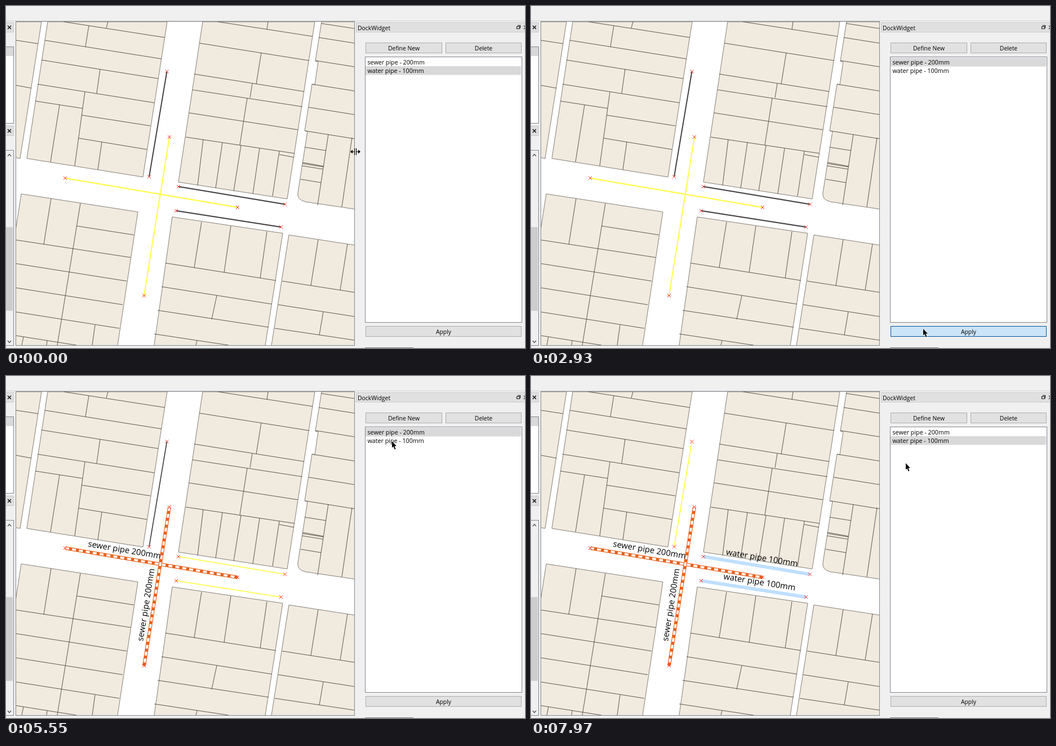
Write an HTML page with a canvas that moves like this. It is 921 px wide and 608 px high and loops after 8 s.

```html
<!DOCTYPE html>
<html lang="en">
<head>
<meta charset="utf-8">
<title>Pipe styles</title>
<style>
html, body { margin: 0; width: 100%; height: 100%; overflow: hidden; background: #f0f0f0; }
canvas { display: block; }
</style>
</head>
<body>
<canvas id="stage" width="921" height="608"></canvas>
<script>
const ctx = document.getElementById('stage').getContext('2d', { alpha: false });
const LOOP = 8000;
const FONT = '"Open Sans", "Noto Sans", sans-serif';
const YELLOW = '#ffff38', DARK = '#403d40', ORANGE = '#e9601a', BLUE = '#bfdfff';
const TITLE_BAR = '#e0e0e0';

// City blocks: outline and the parcel boundaries inside it.
const blocks = [
  ['M10 28H63L25 271L10 268Z',
   'M18 61L57 67M18 141L45 146'],
  ['M74 28H286L243 304L37 271Z',
   'M102 28L282 56M181 28L178 39M147 35L141 72M69 61L276 94M63 96L270 129M167 112L161 155' +
   'M56 139L263 172M140 153L122 284M134 194L256 213M129 235L250 255M170 242L163 291' +
   'M52 169L136 182M95 176L79 277'],
  ['M349 28H548L499 343L306 313Z',
   'M376 28L544 54M465 28L463 42M343 66L538 97M453 83L444 139M334 121L529 152M437 138L433 163' +
   'M331 149L526 179M428 164L415 247M325 190L518 220M319 233L512 262M350 237L340 319' +
   'M384 243L372 324M417 248L404 329M450 253L438 334M485 258L473 338M485 264L511 269'],
  ['M560 28H625V362L531 348Q516 344 518 332L535 223L530 222L543 139L548 140L554 99L549 98Z',
   'M559 31L618 40M555 56L618 66M549 97L618 108M543 139L618 151M537 180L618 193M531 222L618 236' +
   'M572 228L553 354M614 234L596 357M530 251L568 257M526 278L564 285M526 280L563 286' +
   'M525 284L562 290M523 308L559 314'],
  ['M10 445L27 334L234 366L197 610H10Z',
   'M80 342L67 424M132 351L91 603M125 391L227 407M18 416L221 447M18 458L214 489M18 501L207 531' +
   'M18 544L201 573M18 586L125 603M31 588L28 603M73 595L72 603M158 567L153 603'],
  ['M295 375L491 404L459 610H262Z',
   'M347 384L334 465M399 391L387 474M463 401L451 484M283 457L479 488M276 499L472 530' +
   'M374 515L365 557M269 541L466 571M263 583L395 603M339 595L337 603'],
  ['M502 407L618 425L625 426V610H470Z',
   'M554 415L541 497M606 423L593 505M490 489L618 509M483 531L618 552M477 573L618 594M563 544L556 585']
].map(pair => pair.map(d => new Path2D(d)));

const sewerLines = [[105, 306, 411, 358], [290, 233, 245, 515]];
const waterLines = [[306, 321, 495, 352.5], [302, 364, 488, 393]];
const spareLine = [254, 303.5, 285.5, 116.5];

const sewerLabels = [[145, 303, 9.67], [243, 472, -80.9]];
const waterLabels = [[345.5, 317.5, 9.5], [341, 361, 9.1]];

// Pointer stops: time, x, y
const stops = [
  [0, 620, 259], [830, 620, 259], [1580, 701, 99], [2009, 701, 99], [2010, 700, 195],
  [2590, 696, 574], [3409, 696, 574], [3410, 695, 560], [4180, 460, 316], [4310, 460, 316],
  [4720, 463, 416], [4940, 463, 416], [5550, 685, 116], [5700, 686, 105], [5809, 686, 105],
  [5810, 687, 104], [5950, 687, 104], [6310, 730, 570], [6350, 731, 571], [6930, 731, 571],
  [7380, 300, 178], [7440, 300, 178], [7710, 262, 226], [7740, 262, 226], [7970, 665, 155], [8000, 665, 155]
];

function pointerAt(t) {
  const i = Math.max(1, stops.findIndex(s => s[0] > t));
  const [t0, x0, y0] = stops[i - 1], [t1, x1, y1] = stops[i];
  const u = (t - t0) / (t1 - t0), k = u * u * (3 - 2 * u);
  return [x0 + (x1 - x0) * k, y0 + (y1 - y0) * k].map(Math.round);
}

function box(x, y, w, h, fill, stroke) {
  ctx.fillStyle = fill;
  ctx.fillRect(x, y, w, h);
  if (!stroke) return;
  ctx.strokeStyle = stroke;
  ctx.lineWidth = 1;
  ctx.strokeRect(x + 0.5, y + 0.5, w - 1, h - 1);
}

function path(d, color, width = 1) {
  ctx.strokeStyle = color;
  ctx.lineWidth = width;
  ctx.stroke(new Path2D(d));
}

function text(str, x, y, size = 10.4, align = 'left') {
  ctx.font = `${size}px ${FONT}`;
  ctx.textAlign = align;
  ctx.fillStyle = '#000';
  ctx.fillText(str, x, y);
}

function button(label, x, y, w, fill = '#e1e1e1', border = '#adadad') {
  box(x, y, w, 19, fill, border);
  text(label, x + w / 2, y + 13.5, 10.4, 'center');
}

function segment([x0, y0, x1, y1], color, width) {
  path(`M${x0} ${y0}L${x1} ${y1}`, color, width);
}

function vertices([x0, y0, x1, y1]) {
  for (const [x, y] of [[x0, y0], [x1, y1]])
    path(`M${x - 3} ${y - 3}l6 6m0 -6l-6 6`, '#ff3028', 1);
}

function sewerPipe(line) {
  segment(line, ORANGE, 6);
  ctx.setLineDash([7, 5.4]);
  segment(line, '#fff', 3.8);
  ctx.setLineDash([]);
}

function mapLabel(str, [x, y, angle]) {
  ctx.save();
  ctx.translate(x, y);
  ctx.rotate(angle * Math.PI / 180);
  text(str, 0, 0, 14.7);
  ctx.restore();
}

function rubberBand(x0, y0, x1, y1) {
  ctx.fillStyle = 'rgba(254,178,76,.25)';
  ctx.strokeStyle = 'rgba(254,58,29,.4)';
  ctx.lineWidth = 1;
  ctx.fillRect(x0, y0, x1 - x0, y1 - y0);
  ctx.strokeRect(x0, y0, x1 - x0, y1 - y0);
}

function drawMap(t) {
  ctx.save();
  ctx.beginPath();
  ctx.rect(18, 28, 600, 575);
  ctx.clip();
  box(18, 28, 600, 575, '#fff');
  for (const [outline, parcels] of blocks) {
    ctx.fillStyle = '#f1eade';
    ctx.fill(outline);
    ctx.lineWidth = 0.9;
    ctx.strokeStyle = '#77736c';
    ctx.stroke(outline);
    ctx.strokeStyle = '#4b4841';
    ctx.stroke(parcels);
  }

  const darkWidth = t < 3110 ? 1.9 : 1.6;
  segment(spareLine, t < 7750 ? DARK : YELLOW, darkWidth);
  for (const line of waterLines) {
    if (t < 6670) segment(line, t < 4950 ? DARK : YELLOW, darkWidth);
    else segment(line, t < 7750 ? YELLOW : BLUE, 6);
  }
  for (const line of sewerLines) {
    if (t < 4170) segment(line, YELLOW, t < 3110 ? 1.8 : 5.5);
    else sewerPipe(line);
  }
  [spareLine, ...waterLines, ...sewerLines].forEach(vertices);
  if (t >= 3110) sewerLabels.forEach(p => mapLabel('sewer pipe 200mm', p));
  if (t >= 6670) waterLabels.forEach(p => mapLabel('water pipe 100mm', p));

  const [x, y] = pointerAt(t);
  if (t > 4310 && t < 4950) rubberBand(460, 316, x, y);
  if (t > 7440 && t < 7750) rubberBand(300, 178, x, y);
  ctx.restore();
}

function drawLeftPanel() {
  for (const y of [38, 222]) {
    box(-3, y - 9, 17, 18, TITLE_BAR, '#c9c9c9');
    path(`M3 ${y - 3}l6 6m0 -6l-6 6`, '#111', 1.5);
  }
  box(-2, 72, 16, 137, '#fff', '#828790');
  box(0, 73, 13, 16, '#d9d9d9');
  box(-2, 256, 16, 348, '#f0f0f0', '#828790');
  box(0, 393, 12, 149, '#cdcdcd');
  path('M3 267l3 -3.5l3 3.5M3 595l3 3.5l3 -3.5', '#505050', 1.3);
}

function drawDock(t) {
  box(621, 29, 310, 18, TITLE_BAR, '#cdcdcd');
  text('DockWidget', 624, 42.5);
  path('M908.5 35.5v-1h4v4h-1M906.5 36.5h5v4h-5z', '#222', 1.2);
  path('M919 35l3 3l-3 3', '#333', 1.2);

  button('Define New', 638, 65, 136);
  button('Delete', 780, 65, 135);

  box(637, 90, 279, 473, '#fff', '#828790');
  const sewerChosen = t >= 1590 && t < 5680;
  const focused = (t >= 1590 && t < 2930) || (t >= 5680 && t < 6520);
  box(638, sewerChosen ? 92 : 107, 276, 15.5, focused ? '#cce8ff' : '#d9d9d9');
  text('sewer pipe - 200mm', 641.5, 103.5, 10.7);
  text('water pipe - 100mm', 641.5, 119, 10.7);

  const pressed = (t >= 2930 && t < 3020) || (t >= 6520 && t < 6600);
  const hover = (t >= 2570 && t < 3410) || (t >= 6350 && t < 6950);
  if (pressed) button('Apply', 638, 569, 277, '#cce4f7', '#005499');
  else if (hover) button('Apply', 638, 569, 277, '#e5f1fb', '#0078d7');
  else button('Apply', 638, 569, 277);
  box(637, 607, 86, 1, '#777');
}

function drawPointer(t) {
  const [x, y] = pointerAt(t);
  ctx.save();
  ctx.translate(x, y);
  if (x >= 617 && x <= 624) {
    path('M-1.5 -6V6M1.5 -6V6M-8 0H-2M2 0H8', '#000', 1.2);
    ctx.fillStyle = '#000';
    ctx.fill(new Path2D('M-9 0l4 -3.5v7zM9 0l-4 -3.5v7z'));
  } else if (x < 617) {
    box(-1, 0, 11, 10, '#fff');
    ctx.setLineDash([1, 1]);
    path('M-.5 .5h10v9h-10z', '#000');
    ctx.setLineDash([]);
    ctx.fillStyle = '#000';
    ctx.fill(new Path2D('M1 1h6l-2 2l5 5l-2 2l-5 -5l-2 2z'));
  } else {
    const arrow = new Path2D('M0 0V11.5L2.6 9.2L4.6 14.5L6.5 13.7L4.4 8.6H8Z');
    ctx.strokeStyle = 'rgba(255,255,255,.8)';
    ctx.lineWidth = 1;
    ctx.stroke(arrow);
    ctx.fillStyle = '#000';
    ctx.fill(arrow);
  }
  ctx.restore();
}

function draw(t) {
  box(0, 0, 921, 608, '#f0f0f0');
  box(0, 26, 921, 1, '#d2d2d2');
  box(17, 27, 602, 577, '#fff', '#828790');
  drawMap(t);
  drawLeftPanel();
  drawDock(t);
  drawPointer(t);
}

const start = performance.now();
function tick() {
  draw((performance.now() - start) % LOOP);
  requestAnimationFrame(tick);
}
tick();
</script>
</body>
</html>
```
